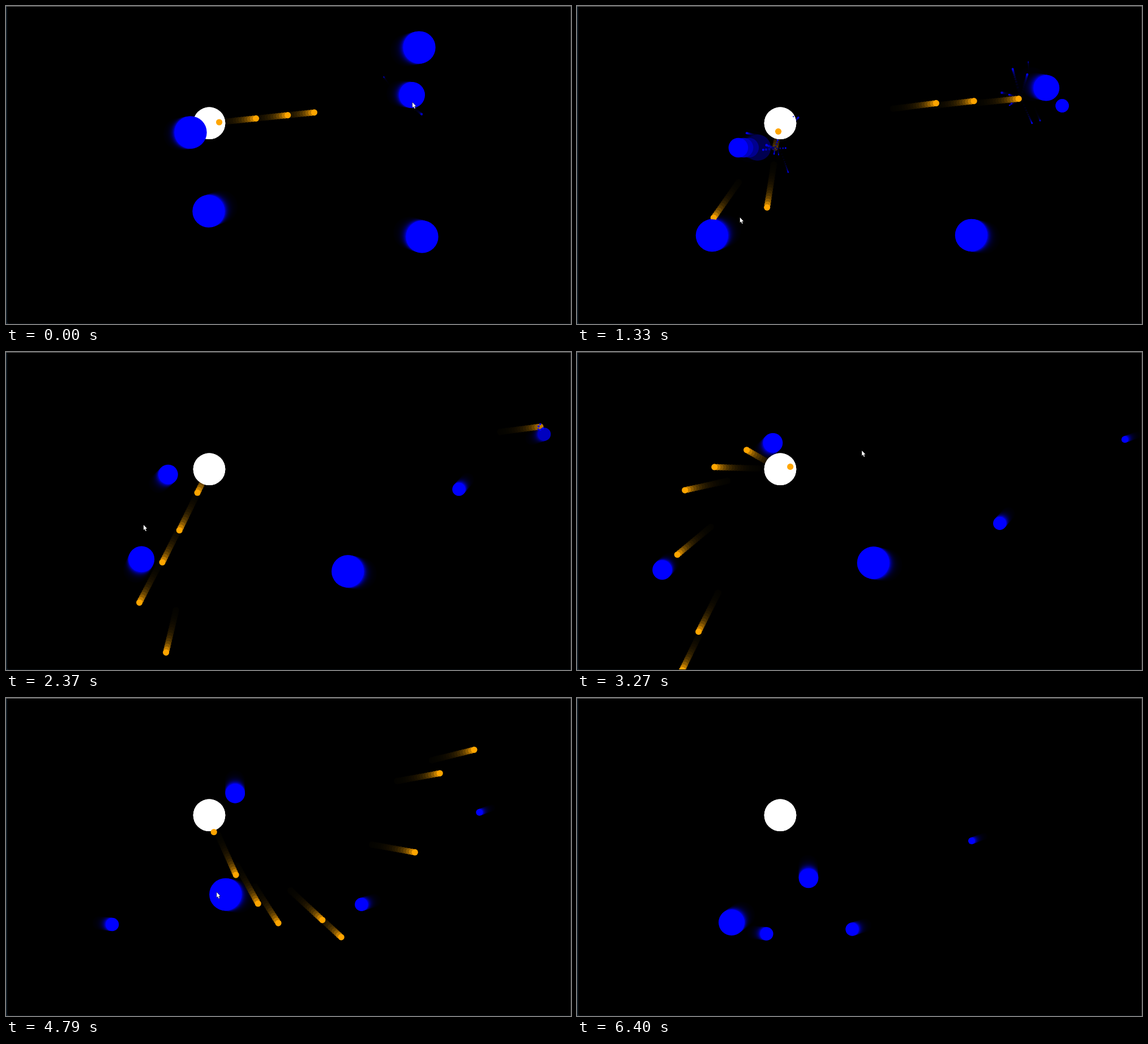
An HTML page with a canvas for the animation above (6.5 s loop, 998 px wide and 561 px high).

```html
<!DOCTYPE html>
<html lang="en">
<head>
<meta charset="utf-8">
<title>Shooter</title>
<style>
  html, body { margin: 0; width: 100%; height: 100%; overflow: hidden; background: #000; }
  canvas { display: block; }
</style>
</head>
<body>
<canvas id="stage" width="998" height="561"></canvas>
<script>
const LOOP = 6500, STEP = 1000 / 60, TRAIL = 15, FADE = 0.25;
const BULLET_SPEED = 0.305, SPARK_LIFE = 420;
const player = { x: 359, y: 206.8, r: 28.3 };
const ctx = document.getElementById('stage').getContext('2d');

// Paths turn at [time, x, y]; the enemy shrinks at each hit time.
const enemies = [
  { hits: [5180],
    path: [[0, 735, 407], [450, 775, 419], [5180, 353, 340], [5430, 343, 344], [6400, 273, 396]] },
  { hits: [1130, 1390, 1700],
    path: [[0, 730, 73], [100, 739, 71], [1130, 806, 140], [1390, 836, 146], [1830, 832, 206],
           [3790, 716, 337], [6400, 486, 408]] },
  { hits: [-330, 650, 1000, 2358],
    path: [[0, 717, 157], [650, 774, 163], [1120, 857, 176], [1330, 857, 176],
           [2358, 951, 145], [2990, 992, 145.5], [6400, 697, 252]] },
  { hits: [1100, 1270],
    path: [[0, 326, 223], [90, 333, 222], [730, 278, 240], [1270, 320, 250], [1330, 285, 250],
           [1775, 247, 253], [4131, 403, 107], [6400, 409, 318]] },
  { hits: [1335, 2390, 3320],
    path: [[0, 358, 362], [1335, 238, 405], [1500, 207, 430], [2390, 240, 364],
           [2500, 190, 345], [3320, 148, 387], [3670, 85, 388], [6400, 335, 416]] }
];

const pointer = [
  [0, 718, 170], [421, 700, 163], [662, 270, 333], [838, 335, 360], [1282, 320, 372],
  [1330, 288, 373], [1500, 264, 388], [2206, 270, 395], [2370, 243, 305], [2497, 243, 303],
  [2706, 208, 240], [2890, 215, 202], [3047, 260, 150], [3211, 500, 172], [3434, 512, 179],
  [3581, 510, 234], [3751, 460, 300], [3899, 463, 303], [4050, 454, 355], [4413, 432, 370],
  [4690, 405, 373], [4850, 353, 325], [5430, 768, 436]
];

// Each click fires a bullet from the player towards the pointer.
const clicks = [-610, -456, -271, -57, 202, 421, 662, 838, 1000, 1120, 1282, 1500, 1768, 1978,
  2219, 2497, 2706, 2890, 3047, 3211, 3434, 3581, 3751, 3899, 4050, 4207, 4413, 4690, 4850];

function along(path, t) {
  let i = 1;
  while (i < path.length - 1 && t > path[i][0]) i++;
  const [t0, x0, y0] = path[i - 1], [t1, x1, y1] = path[i];
  const k = (t - t0) / (t1 - t0);
  return [x0 + (x1 - x0) * k, y0 + (y1 - y0) * k];
}

function rand(n) {
  const v = Math.sin(n * 12.9898) * 43758.5453;
  return v - Math.floor(v);
}

const sizeAt = (enemy, t) => 28.6 - 5.65 * enemy.hits.filter(h => t >= h).length;

const bullets = clicks.map(fired => {
  const [x, y] = along(pointer, Math.max(0, fired));
  return { fired, angle: Math.atan2(y - player.y, x - player.x), gone: Infinity };
});

function bulletAt({ fired, angle }, t) {
  const d = BULLET_SPEED * (t - fired);
  return [player.x + d * Math.cos(angle), player.y + d * Math.sin(angle)];
}

// A hit uses up the nearest bullet in reach and throws sparks.
const bursts = enemies
  .flatMap(enemy => enemy.hits.map(time => ({ enemy, time })))
  .sort((a, b) => a.time - b.time)
  .map(({ enemy, time }) => {
    const [x, y] = along(enemy.path, time);
    let reach = sizeAt(enemy, time) + 45, used = null;
    for (const b of bullets) {
      if (time < b.fired || time >= b.gone) continue;
      const [bx, by] = bulletAt(b, time), d = Math.hypot(bx - x, by - y);
      if (d < reach) [reach, used] = [d, b];
    }
    if (used) used.gone = time;
    const [cx, cy] = used ? bulletAt(used, time) : [x, y];
    return { time, x: cx, y: cy };
  });

function disc(x, y, r, color) {
  ctx.fillStyle = color;
  ctx.beginPath();
  ctx.arc(x, y, r, 0, 2 * Math.PI);
  ctx.fill();
}

function drawSparks({ time, x, y }, t) {
  const k = (t - time) / SPARK_LIFE;
  if (k < 0 || k >= 1) return;
  const ease = 1 - (1 - k) ** 3;
  ctx.globalAlpha = Math.min(1, 2 - 2 * k);
  for (let i = 0; i < 5; i++) {
    const seed = time + i * 7;
    const a = 2 * Math.PI * rand(seed), d = ease * (25 + 50 * rand(seed + 1));
    disc(x + d * Math.cos(a), y + d * Math.sin(a), 1 + 1.3 * rand(seed + 2), '#00f');
  }
  ctx.globalAlpha = 1;
}

function drawScene(t) {
  disc(player.x, player.y, player.r, '#fff');
  for (const b of bullets) {
    if (t >= b.fired && t < b.gone) disc(...bulletAt(b, t), 5.6, '#ffa500');
  }
  for (const enemy of enemies) {
    const struck = enemy.hits.some(h => t >= h && t < h + 20);
    if (!struck) disc(...along(enemy.path, t), sizeAt(enemy, t), '#00f');
  }
  bursts.forEach(b => drawSparks(b, t));
}

function drawPointer(t) {
  const [x, y] = along(pointer, t);
  ctx.save();
  ctx.translate(x, y);
  ctx.beginPath();
  [[0, 0], [0, 9], [2, 7.2], [3.6, 11], [5, 10.4], [3.5, 6.8], [6.2, 6.6]]
    .forEach(p => ctx.lineTo(...p));
  ctx.closePath();
  ctx.strokeStyle = '#000';
  ctx.stroke();
  ctx.fillStyle = '#fff';
  ctx.fill();
  ctx.restore();
}

function bar(color, x, y, w, h) {
  ctx.fillStyle = color;
  ctx.fillRect(x, y, w, h);
}

function draw(t) {
  bar('#000', 0, 0, 998, 561);
  for (let i = TRAIL; i >= 0; i--) {
    bar(`rgba(0,0,0,${FADE})`, 0, 0, 998, 561);
    drawScene(t - i * STEP);
  }
  drawPointer(t);
  bar('#14202a', 0, 0, 2, 561);
  bar('#14202a', 2, 559, 2, 2);
  bar('#0c1318', 2, 560, 996, 1);
  bar('#333', 997, 0, 1, 561);
  bar('#666', 0, 0, 998, 1);
}

const start = performance.now();

function tick() {
  const t = (performance.now() - start) % LOOP;
  draw(Math.min(t, 6400));
  requestAnimationFrame(tick);
}
tick();
</script>
</body>
</html>
```
